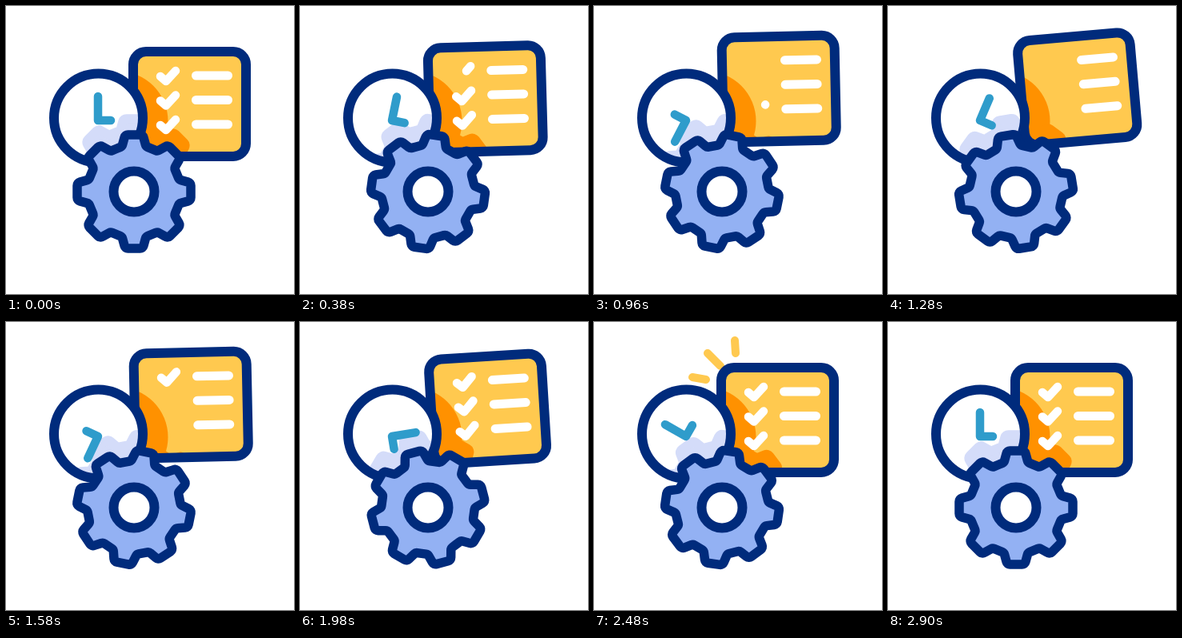
Write an HTML page with a canvas that moves like this. It is 360 px wide and 360 px high and loops after 3260 ms.

```html
<!DOCTYPE html>
<html>
<head>
<meta charset="utf-8">
<style>
html, body { margin: 0; width: 100%; height: 100%; overflow: hidden; background: #fff; }
canvas { display: block; width: 360px; height: 360px; }
</style>
</head>
<body>
<canvas id="stage" width="360" height="360"></canvas>
<script>
const ctx = document.getElementById('stage').getContext('2d');
const LOOP = 3260, START = 220, END = 2860;
const NAVY = '#002b7c', YELLOW = '#ffc94f', ORANGE = '#ff9100',
      BLUE = '#93b1f3', PALE = '#d4dcf9', TEAL = '#2f9ccb';

const TILT = [[220, 0], [650, -5], [960, -1.2], [1270, -5], [1580, -1.2], [1840, -5], [2230, 0]];
const LIFT = [[220, 0], [640, 1], [1820, 1], [2300, 0]];
const SPIN = [[220, 0], [660, 50], [960, 146], [1580, 371], [1980, 525], [2480, 683], [2860, 720]];
// hide start, hide end, show start, show end for each tick
const TICKS = [[220, 470, 1320, 1560], [460, 720, 1585, 1780], [720, 970, 1770, 1970]];
const SPARKS = [[177, 39, 176, 23], [158, 55, 142, 39], [140, 72, 123, 69]];

const clamp = v => Math.max(0, Math.min(1, v));
const part = (t, a, b) => clamp((t - a) / (b - a));
const smooth = u => u * u * (3 - 2 * u);

// eased steps between keys
function keyed(keys, t) {
  if (t <= keys[0][0]) return keys[0][1];
  for (let i = 1; i < keys.length; i++) {
    const [a, va] = keys[i - 1], [b, vb] = keys[i];
    if (t <= b) return va + (vb - va) * smooth((t - a) / (b - a));
  }
  return keys[keys.length - 1][1];
}

// continuous curve through keys, at rest at both ends
function curve(keys, t) {
  const n = keys.length - 1;
  if (t <= keys[0][0]) return keys[0][1];
  if (t >= keys[n][0]) return keys[n][1];
  const slope = i => i === 0 || i === n ? 0 :
    (keys[i + 1][1] - keys[i - 1][1]) / (keys[i + 1][0] - keys[i - 1][0]);
  let i = 0;
  while (t > keys[i + 1][0]) i++;
  const [a, va] = keys[i], [b, vb] = keys[i + 1];
  const d = b - a, u = (t - a) / d, v = 1 - u;
  return va + (vb - va) * smooth(u) + d * (slope(i) * u * v * v - slope(i + 1) * u * u * v);
}

function circle(x, y, r) {
  const p = new Path2D();
  p.arc(x, y, r, 0, Math.PI * 2);
  return p;
}

function gearPath() {
  const pts = [];
  for (let i = 0; i < 8; i++) {
    const a = i * Math.PI / 4, c = Math.cos(a), s = Math.sin(a);
    for (const [x, y] of [[-15, -56.5], [-11, -71], [11, -71], [15, -56.5]])
      pts.push([x * c - y * s, x * s + y * c]);
  }
  const p = new Path2D(), n = pts.length, last = pts[n - 1];
  p.moveTo((last[0] + pts[0][0]) / 2, (last[1] + pts[0][1]) / 2);
  pts.forEach((q, i) => {
    const next = pts[(i + 1) % n];
    p.arcTo(q[0], q[1], next[0], next[1], 4.5);
  });
  p.closePath();
  return p;
}

const gear = gearPath();
const card = new Path2D();
card.roundRect(-70.5, -65.5, 141, 131, 16);
const face = circle(115.5, 140, 55.5);

function stroke(path, color, width) {
  ctx.strokeStyle = color;
  ctx.lineWidth = width;
  ctx.stroke(path);
}

function fill(path, color) {
  ctx.fillStyle = color;
  ctx.fill(path);
}

function line(color, width, ...xy) {
  const p = new Path2D();
  for (let i = 0; i < xy.length; i += 2) p.lineTo(xy[i], xy[i + 1]);
  stroke(p, color, width);
}

function turned(x, y, deg, draw) {
  ctx.save();
  ctx.translate(x, y);
  ctx.rotate(deg * Math.PI / 180);
  draw();
  ctx.restore();
}

function drawCog(x, y, spin, inside, edge) {
  turned(x, y, spin, () => {
    fill(gear, inside);
    stroke(gear, edge, 11.5);
  });
}

// the stretch of a tick between two fractions of its length
function tick(y, from, to) {
  if (to - from < 0.001) return;
  const pts = [[193, y + 1], [200, y + 7], [212, y - 6]];
  const bend = 0.35;
  const at = f => {
    const i = f < bend ? 0 : 1;
    const u = i ? (f - bend) / (1 - bend) : f / bend;
    return pts[i].map((v, k) => v + (pts[i + 1][k] - v) * u);
  };
  const mid = from < bend && to > bend ? pts[1] : [];
  line('#fff', 10.5, ...at(from), ...mid, ...at(to));
}

function drawCard(t, spin) {
  const tilt = keyed(TILT, t), lift = keyed(LIFT, t);
  const x = 229.5 - tilt * 1.45, y = 122.5 - 19 * lift;
  turned(x, y, tilt, () => fill(card, YELLOW));

  ctx.save();
  const clip = new Path2D();
  clip.addPath(card, new DOMMatrix().translate(x, y).rotate(tilt));
  ctx.clip(clip);
  fill(circle(140, 144, 62.5), ORANGE);
  drawCog(167, 216, spin, ORANGE, ORANGE);
  ctx.restore();

  turned(x, y, tilt, () => {
    stroke(card, NAVY, 12);
    ctx.translate(-229.5, -122.5);
    TICKS.forEach(([h0, h1, s0, s1], i) => {
      const row = 87 + i * 30.5;
      line('#fff', 11, 237.5, row, 277.5, row);
      if (t < h1) tick(row, smooth(part(t, h0, h1)), 1);
      else tick(row, 0, smooth(part(t, s0, s1)));
    });
  });
}

function drawClock(t, spin) {
  fill(face, '#fff');
  ctx.save();
  ctx.clip(face);
  drawCog(158, 212, spin, PALE, PALE);
  ctx.restore();
  turned(115, 143, 1080 * smooth(part(t, START, END)), () =>
    line(TEAL, 10.5, 0, -30, 0, 0, 16, 0));
  stroke(face, NAVY, 12);
}

function drawGear(spin) {
  drawCog(160, 232, spin, BLUE, NAVY);
  const hub = circle(160, 232, 25.5);
  fill(hub, '#fff');
  stroke(hub, NAVY, 12);
}

function drawSparks(t) {
  const head = smooth(part(t, 2330, 2480)), tail = smooth(part(t, 2480, 2720));
  if (head - tail < 0.001) return;
  for (const [x0, y0, x1, y1] of SPARKS) {
    const dx = x1 - x0, dy = y1 - y0;
    line(YELLOW, 10, x0 + dx * tail, y0 + dy * tail, x0 + dx * head, y0 + dy * head);
  }
}

function render(t) {
  const spin = curve(SPIN, t);
  ctx.fillStyle = '#fff';
  ctx.fillRect(0, 0, 360, 360);
  ctx.lineCap = ctx.lineJoin = 'round';
  drawSparks(t);
  drawCard(t, spin);
  drawClock(t, spin);
  drawGear(spin);
}

const begin = performance.now();
function loop() {
  render((performance.now() - begin) % LOOP);
  requestAnimationFrame(loop);
}
loop();
</script>
</body>
</html>
```
